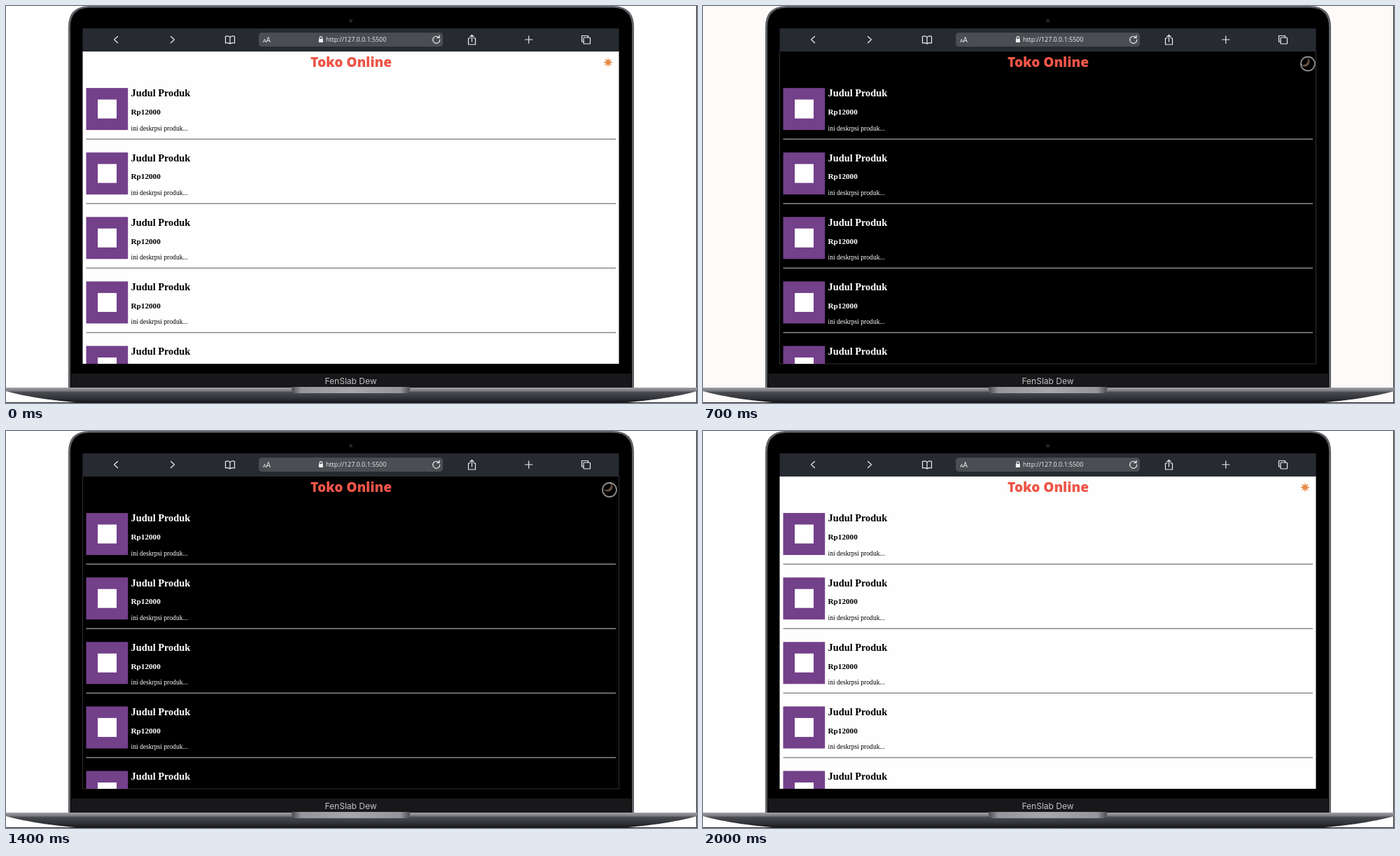
Animation, 987 px wide and 567 px high, one loop 2.5 s. Source, as an HTML page:

```html
<!DOCTYPE html>
<html lang="id">
<head>
<meta charset="utf-8">
<title>Toko Online</title>
<style>
html, body { margin: 0; width: 100%; height: 100%; overflow: hidden; background: #fff; }
svg { display: block; width: 987px; height: 567px; }
.serif { font-family: "Liberation Serif", serif; }
.ui { font-family: "Open Sans", sans-serif; }
.line { fill: none; stroke: #eee; stroke-width: 1.2; stroke-linecap: round; stroke-linejoin: round; }
#page { fill: #fefefe; stroke: #222; stroke-width: 0; }
#items { fill: #000; }
.dark #page { fill: #000; stroke: #303030; stroke-width: 1; }
.dark #items { fill: #fff; }
.dark #sun, #moon { display: none; }
.dark #moon { display: inline; }
</style>
</head>
<body>
<svg id="stage" viewBox="0 0 987 567">
  <defs>
    <linearGradient id="base" x2="0" y2="1">
      <stop offset="0" stop-color="#a0a2a6"/>
      <stop offset=".22" stop-color="#77797e"/>
      <stop offset=".3" stop-color="#4a4c52"/>
      <stop offset=".7" stop-color="#303238"/>
      <stop offset="1" stop-color="#141519"/>
    </linearGradient>
    <linearGradient id="notch">
      <stop offset="0" stop-color="#4b4d52"/>
      <stop offset=".08" stop-color="#94969b"/>
      <stop offset=".5" stop-color="#a5a7ab"/>
      <stop offset=".92" stop-color="#94969b"/>
      <stop offset="1" stop-color="#4b4d52"/>
    </linearGradient>
    <clipPath id="view"><rect x="109.5" y="65" width="766" height="446"/></clipPath>
  </defs>

  <path d="M986.5 0V566.5H0" fill="none" stroke="#222"/>

  <!-- laptop -->
  <path d="M89 546V30Q89 0 119 0H867Q897 0 897 30V546Z" fill="#5f6166"/>
  <path d="M92 546V30Q92 2.500 119 2.500H867Q894 2.500 894 30V546Z" fill="#000"/>
  <rect x="93" y="525" width="800" height="20" fill="#18181a"/>
  <circle cx="492.500" cy="21" r="2.500" fill="#242427"/>
  <text x="492.500" y="539.500" font-size="12" text-anchor="middle" fill="#c4c4c6" font-family="Inter, sans-serif">FenSlab Dew</text>
  <path d="M0 545H987V550C960 558 905 566 870 567H117C82 566 27 558 0 550Z" fill="url(#base)"/>
  <path d="M408 544H577V547Q577 553 570 553H415Q408 553 408 547Z" fill="url(#notch)"/>

  <!-- browser -->
  <rect id="page" x="109.500" y="64.500" width="766" height="446.500"/>
  <rect x="109.500" y="32" width="766" height="33" fill="#272a31"/>
  <rect x="361" y="38" width="263" height="20" rx="4.500" fill="#4b4d52"/>
  <g class="ui" fill="#f2f2f2">
    <text x="367" y="51.500" font-size="7.500">A</text>
    <text x="371.500" y="51.500" font-size="10">A</text>
    <text x="457" y="51.300" font-size="8.900">http://127.0.0.1:5500</text>
    <rect x="446.800" y="47" width="6" height="5" rx=".8"/>
  </g>
  <g class="line">
    <path d="M448 47V45.500a1.800 1.800 0 0 1 3.600 0V47"/>
    <path d="M159.500 43.500L154.500 48L159.500 52.500M235.500 43.500L240.500 48L235.500 52.500"/>
    <path d="M320 44.500Q317 42 313.500 43.500V53Q317 52 320 54Q323 52 326.500 53V43.500Q323 42 320 44.500V54"/>
    <path d="M618.500 45A5 5 0 1 0 619.700 48M619 42V45.500H615.500"/>
    <path d="M663 46H660.500V55H670.500V46H668M665.500 51V41.500M662.800 44L665.500 41.300L668.200 44"/>
    <path d="M741.500 48H752M746.750 42.800V53.200"/>
    <path d="M825 51H822.500V42.500H831.500V45"/>
    <rect x="825" y="45" width="9.500" height="9" rx="1"/>
  </g>

  <!-- shop -->
  <text class="ui" x="493" y="87.300" font-size="19" font-weight="800" text-anchor="middle" fill="#ee5548">Toko Online</text>
  <g id="items" class="serif" clip-path="url(#view)"></g>
  <g id="sun" fill="#e58a45">
    <circle cx="860" cy="80.500" r="3.600"/>
    <path id="rays" stroke="#e58a45" stroke-width="1.300"/>
  </g>
  <path id="moon" d="M862.500 73.500A6.800 6.800 0 1 1 853.500 82.500A6.400 6.400 0 0 0 862.500 73.500Z" fill="#f3c3a0"/>

  <g id="cursor">
    <circle r="9.500" fill="#000" fill-opacity=".6"/>
    <circle r="10" fill="none" stroke="#fff" stroke-opacity=".55" stroke-width="1.800"/>
  </g>
</svg>
<script>
const $ = id => document.getElementById(id);

const item = y => `<g transform="translate(0 ${y})">
  <rect x="114.5" width="59.700" height="60" fill="#73408a"/>
  <rect x="131" y="16.500" width="27" height="27" fill="#fff"/>
  <text x="178.500" y="12.300" font-size="14.360" font-weight="bold">Judul Produk</text>
  <text x="178.500" y="38.300" font-size="11.200" font-weight="bold">Rp12000</text>
  <text x="178.500" y="60.600" font-size="9.580">ini deskrpsi produk...</text>
  <rect x="114.500" y="72.300" width="756.500" height="1.500" fill="#8a8a8a"/>
</g>`;
$("items").innerHTML = [0, 1, 2, 3, 4].map(i => item(117.1 + i * 92.1)).join("");

let rays = "";
for (let a = 0; a < 8; a++) {
  const c = Math.cos(a * Math.PI / 4), s = Math.sin(a * Math.PI / 4);
  rays += `M${860 + 3 * c} ${80.5 + 3 * s}L${860 + 6 * c} ${80.5 + 6 * s}`;
}
$("rays").setAttribute("d", rays);

// start time, x, y; no position means hidden
const path = [
  [0], [400, 867, 84], [600, 864, 82.5], [900, 863, 102], [1000, 859, 140],
  [1100, 857, 154], [1200, 857, 146], [1300, 860, 106], [1400, 862, 84],
  [1900, 885, 88], [2000]
];

function draw(now) {
  const t = now % 2500;
  const [, x, y] = path.findLast(p => p[0] <= t);
  $("stage").setAttribute("class", t >= 700 && t < 1500 ? "dark" : "");
  $("cursor").style.display = x ? "" : "none";
  if (x) $("cursor").setAttribute("transform", `translate(${x} ${y})`);
  document.body.style.background = t >= 700 && t < 1400 ? "#fffafa" : "#fff";
  requestAnimationFrame(draw);
}

const start = performance.now();
requestAnimationFrame(now => draw(Math.max(0, now - start)));
</script>
</body>
</html>
```
